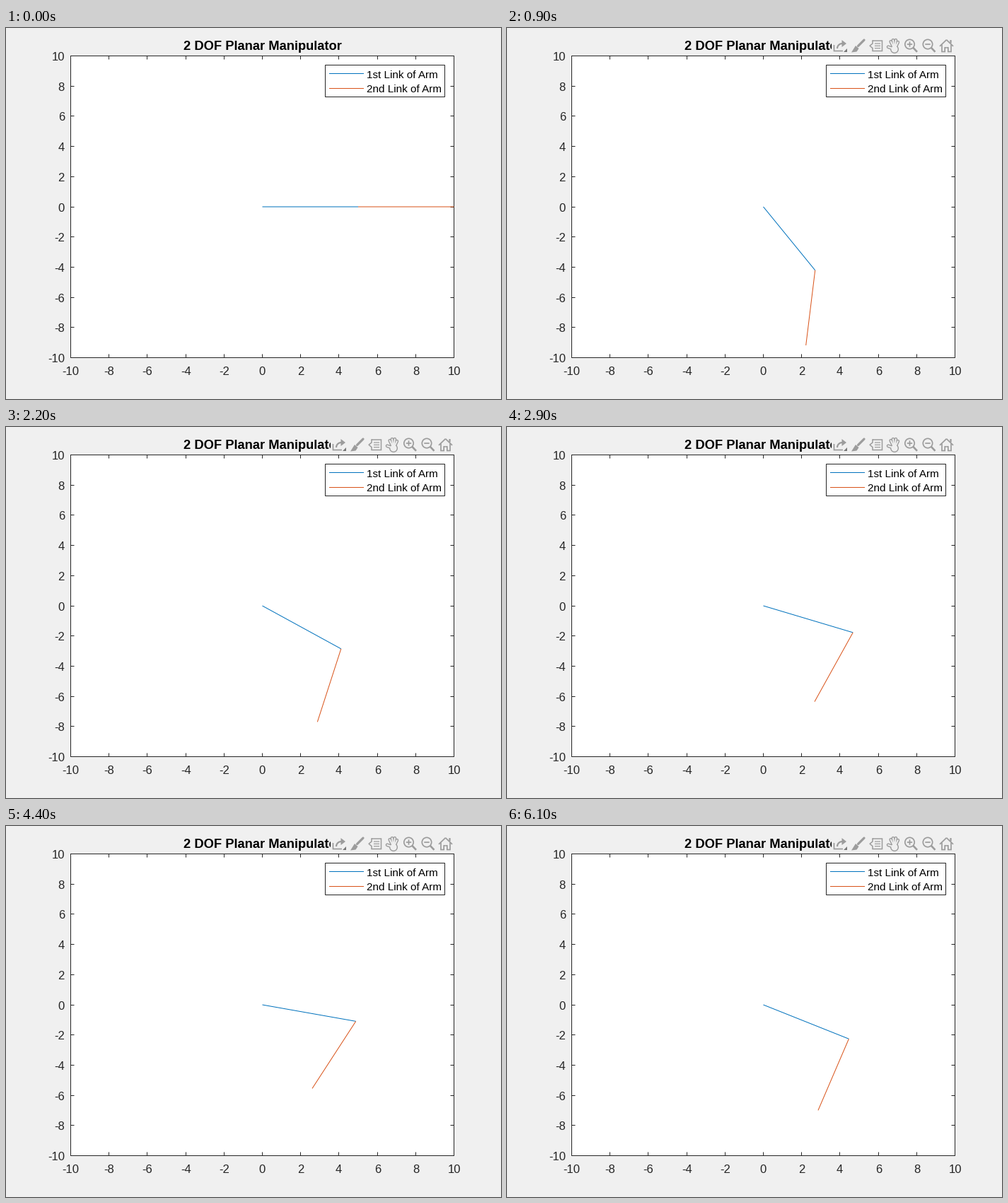
A matplotlib script for the animation above (6200 ms loop, 700 by 525 pixels).

```python
import numpy as np
import matplotlib.pyplot as plt
from matplotlib.animation import FuncAnimation
from matplotlib.patches import Circle, Polygon, Rectangle

W, H, DPI = 700, 525, 100
PT = 72 / DPI  # points per pixel
FRAMES, STEP = 62, 100

LEFT, RIGHT, TOP, BOTTOM = 91.5, 633.5, 39.5, 466.5
CX, CY = (LEFT + RIGHT) / 2, (TOP + BOTTOM) / 2
SX, SY = (RIGHT - LEFT) / 20, (BOTTOM - TOP) / 20
LINK = 5

BACK, INK, ICON = "#f0f0f0", "#262626", "#9c9c9c"
BLUE, RED = "#0072bd", "#d95319"

plt.rcParams["font.family"] = "Liberation Sans"
fig = plt.figure(figsize=(W / DPI, H / DPI), dpi=DPI, facecolor=BACK)
ax = fig.add_axes([0, 0, 1, 1])
ax.set_xlim(0, W)
ax.set_ylim(H, 0)
ax.axis("off")


def line(points, color=INK, width=1, z=2, cap="butt"):
    xs, ys = zip(*points)
    return ax.plot(xs, ys, color=color, lw=width * PT, zorder=z, snap=False,
                   solid_capstyle=cap, solid_joinstyle="miter")[0]


def label(x, y, text, size, align="center", color=INK, weight="normal"):
    ax.text(x, y, text, fontsize=size * PT, ha=align, va="baseline",
            color=color, weight=weight, zorder=3)


def box(x0, y0, x1, y1, fill, edge="none", z=1):
    return ax.add_patch(Rectangle((x0, y0), x1 - x0, y1 - y0, fc=fill,
                                  ec=edge, lw=PT, zorder=z, snap=False))


def pixel(v):
    """Centre of the pixel that holds v."""
    return np.floor(v) + 0.5


def draw_axes():
    box(LEFT, TOP, RIGHT, BOTTOM, "white", INK)
    for v in range(-10, 11, 2):
        x, y = pixel(CX + v * SX), pixel(CY - v * SY)
        for edge, inward in ((TOP, 5), (BOTTOM, -5)):
            line([(x, edge), (x, edge + inward)])
        for edge, inward in ((LEFT, 5), (RIGHT, -5)):
            line([(edge, y), (edge + inward, y)])
        label(x, 491, str(v), 16.67)
        label(83, y + 6.5, str(v), 16.67, "right")
    label(363, 31, "2 DOF Planar Manipulator", 18.33,
          color="black", weight="bold")


def draw_legend():
    box(451.5, 52.5, 620.5, 97.5, "white", INK, z=2)
    for y, base_y, color, text in ((64.5, 71, BLUE, "1st Link of Arm"),
                                   (85.5, 91, RED, "2nd Link of Arm")):
        line([(457, y), (506, y)], color, z=3)
        label(510, base_y, text, 15.2, "left", "black")


def draw_toolbar():
    parts = [box(459, 14, 634, 38, BACK, z=5)]

    def stroke(points, width=1.7, color=ICON, z=6, cap="butt"):
        parts.append(line(points, color, width, z, cap))

    def solid(points, color=ICON, z=6):
        parts.append(ax.add_patch(Polygon(points, fc=color, ec="none", zorder=z)))

    # export: tray, bent arrow, menu corner
    stroke([(462.5, 24), (462.5, 32.5), (475, 32.5)])
    bend = np.linspace(np.pi, np.pi / 2, 8)
    stroke([(474 + 7 * np.cos(a), 29 - 7 * np.sin(a)) for a in bend], 2.2)
    solid([(473.5, 17), (480, 22), (473.5, 27)])
    solid([(481, 29), (481, 34), (476, 34)], "#777777")

    # brush
    stroke([(505, 17), (496.5, 25.5)], 3.2, cap="round")
    solid([(493, 25), (497.5, 29), (494.5, 33.5), (487, 34.5)])

    # data tip
    stroke([(517, 18), (530.5, 18), (530.5, 32.5), (517, 32.5), (517, 28.5),
            (513, 25.2), (517, 22), (517, 17.2)], 1.5)
    for i in range(3):
        stroke([(520, 22 + 3.3 * i), (528, 22 + 3.3 * i)], 1.2)

    # hand: fingers fanned from the palm, outlined by a thinner inner stroke
    hub = np.array([548, 30])
    spread = np.radians([160, 116, 99, 82, 64])
    length = [9.5, 12, 13, 13, 11]
    tips = [hub + r * np.array([np.cos(a), -np.sin(a)])
            for a, r in zip(spread, length)]
    for width, color, z in ((4.8, ICON, 6), (2, BACK, 7)):
        for tip in tips:
            stroke([hub, tip], width, color, z, "round")
        parts.append(ax.add_patch(Circle(hub, 3.6 + width / 2, fc=color,
                                         ec="none", zorder=z)))

    # magnifiers
    for x, plus in ((569.5, True), (595, False)):
        parts.append(ax.add_patch(Circle((x, 23), 6.7, fc="none", ec=ICON,
                                         lw=1.7 * PT, zorder=6)))
        stroke([(x + 4.8, 27.8), (x + 10.5, 33.8)], 2.6)
        stroke([(x - 3.7, 23), (x + 3.7, 23)])
        if plus:
            stroke([(x, 19.3), (x, 26.7)])

    # home: two mirrored halves
    for side in (-1, 1):
        half = [(9.5, 25.8), (0, 16.7)], [(6.5, 23.5), (6.5, 33.5), (2.3, 33.5),
                                          (2.3, 27.8), (0, 27.8)]
        for path in half:
            stroke([(621.5 + side * x, y) for x, y in path])
    stroke([(627.5, 17), (627.5, 21.5)], 2.2)
    return parts


# key poses: frame, then both link angles in radians below the horizontal
POSES = np.array([
    (1, 0, 0),
    (7, 1.05, 1.635),
    (9, 1.0, 1.667),
    (22, 0.607, 1.82),
    (30, 0.335, 2.0),
    (40, 0.19, 2.065),
    (50, 0.317, 1.985),
    (61, 0.469, 1.897),
])
TIMES, ANGLES = POSES[:, 0], POSES[:, 1:]
SLOPES = np.gradient(ANGLES, TIMES, axis=0)
SLOPES[0] = 0


def pose(frame):
    """Both angles on a cubic Hermite curve through the key poses."""
    t = max(frame, TIMES[0])
    i = min(np.searchsorted(TIMES, t, side="right"), len(TIMES) - 1) - 1
    span = TIMES[i + 1] - TIMES[i]
    u = (t - TIMES[i]) / span
    ease = u * u * (3 - 2 * u)
    bend = u * (1 - u) * ((1 - u) * SLOPES[i] - u * SLOPES[i + 1])
    return ANGLES[i] + ease * (ANGLES[i + 1] - ANGLES[i]) + span * bend


def reach(start, angle):
    return (start[0] + LINK * SX * np.cos(angle),
            start[1] + LINK * SY * np.sin(angle))


draw_axes()
draw_legend()
toolbar = draw_toolbar()
base = (CX, CY)
link1 = line([base, base], BLUE, z=4)
link2 = line([base, base], RED, z=4)


def update(frame):
    first, second = pose(frame)
    elbow = reach(base, first)
    tip = reach(elbow, second)
    link1.set_data(*zip(base, elbow))
    link2.set_data(*zip(elbow, tip))
    for part in toolbar:
        part.set_visible(frame >= 2)
    return [link1, link2, *toolbar]


anim = FuncAnimation(fig, update, frames=FRAMES, interval=STEP,
                     repeat=True, repeat_delay=0, blit=False)
plt.show()
```
